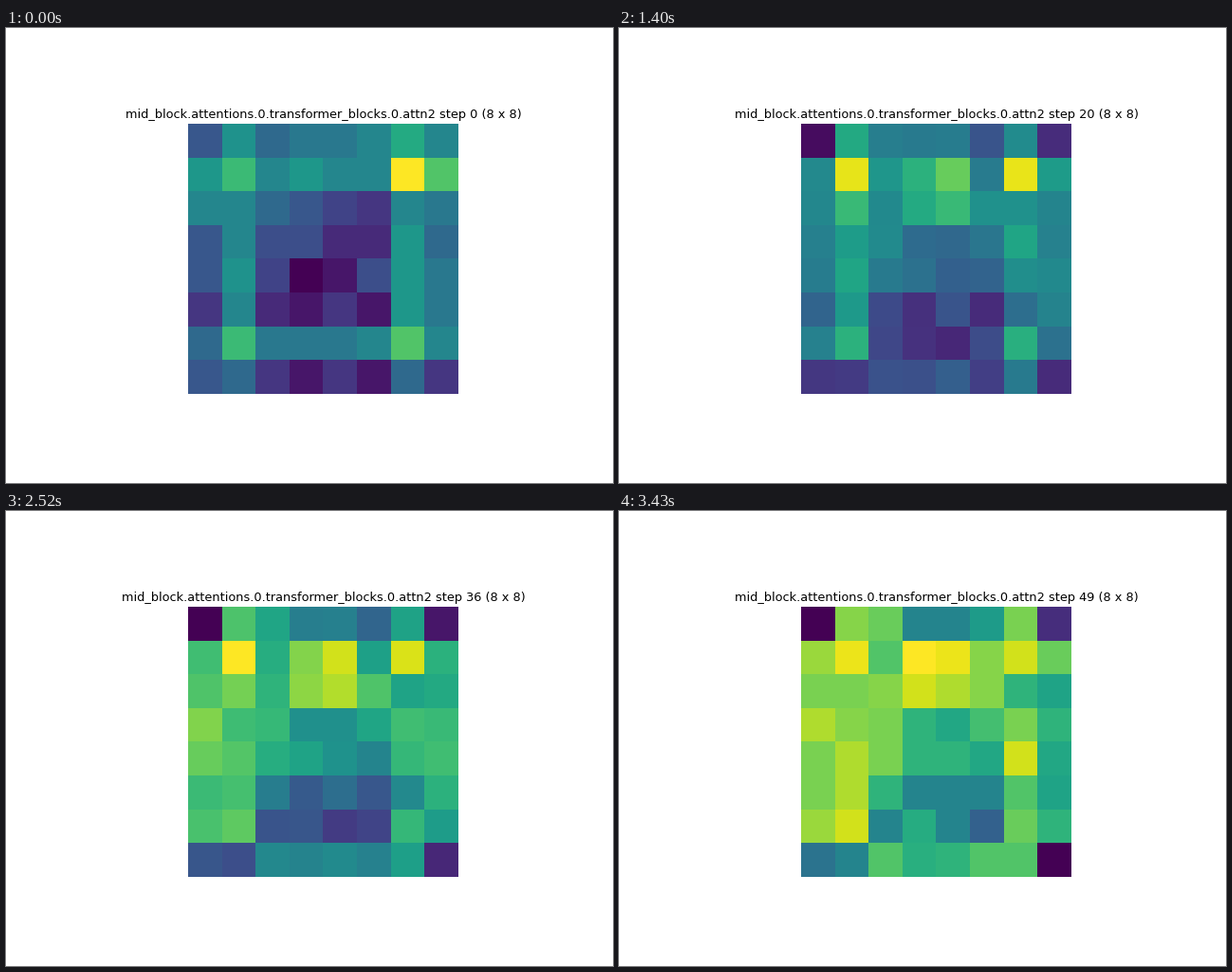
A matplotlib script that plays this animation: 640x480 px, repeating every 3.5 s.

```python
import numpy as np
import matplotlib.pyplot as plt
from matplotlib.animation import FuncAnimation

STEPS, INTERVAL = 50, 70
WIDTH, HEIGHT, DPI = 640, 480, 100
TITLE = "mid_block.attentions.0.transformer_blocks.0.attn2 step {} (8 x 8)"

# Attention in percent at the first and the last step.
first = np.array([
    [27, 51, 34, 40, 40, 46, 61, 46],
    [53, 68, 46, 53, 46, 46, 100, 73],
    [46, 46, 34, 27, 20, 16, 46, 40],
    [27, 46, 24, 24, 12, 12, 53, 34],
    [27, 51, 20, 0, 6, 24, 53, 40],
    [16, 46, 12, 6, 16, 6, 53, 40],
    [34, 68, 40, 40, 40, 46, 73, 46],
    [27, 34, 16, 6, 16, 6, 34, 16],
])
last = np.array([
    [0, 82, 77, 45, 45, 55, 80, 13],
    [85, 97, 73, 100, 97, 82, 93, 77],
    [80, 80, 82, 93, 88, 82, 65, 58],
    [88, 82, 80, 65, 60, 70, 80, 65],
    [80, 88, 80, 65, 65, 60, 93, 60],
    [80, 88, 65, 45, 45, 45, 73, 58],
    [85, 93, 45, 62, 45, 31, 77, 65],
    [38, 45, 73, 63, 65, 73, 73, 0],
])

rows, cols = np.mgrid[:8, :8]


def bump(row, col, height, row_spread=0.4, col_spread=0.4):
    return height * np.exp(-((rows - row) / row_spread) ** 2 / 2
                           - ((cols - col) / col_spread) ** 2 / 2)


# Passing attention: eyes and face rise, corners and mouth sink.
passing = sum([
    bump(1.3, 1, 26, 0.7), bump(1.7, 4, 36, 0.7), bump(2.4, 5, 26, 0.6),
    bump(2, 3, 20), bump(4, 3, 24), bump(3.3, 2, 14, 0.7), bump(4, 4, 12, 0.8),
    bump(0, 0, -20, 0.6), bump(1.5, 0, -18, 0.5), bump(0.4, 7, -34, 0.6),
    bump(0, 6, -15), bump(0.4, 5, -30, 0.5), bump(4.7, 6, -24, 0.6),
    bump(6, 3.5, -33, 0.4, 1.5), bump(7, 0.6, -24, 0.4, 0.6),
    bump(7, 3.4, 12, 0.4, 0.5), bump(6, 7, -13, 0.5),
])
# The side columns brighten late.
sides = bump(3.5, 0, 26, 2.2) + bump(4, 7, 24, 2)


def attention(step):
    s = step / (STEPS - 1)
    drift = s ** 1.8
    swell = max(np.sin(np.pi * s), 0) ** 0.6
    late = swell * np.exp(-((step - 33) / 7) ** 2 / 2)
    grid = first + (last - first) * drift + passing * swell + sides * late
    return grid.clip(0, 100)


fig = plt.figure(figsize=(WIDTH / DPI, HEIGHT / DPI), dpi=DPI, facecolor="white")
ax = fig.add_axes([192 / WIDTH, 94 / HEIGHT, 285 / WIDTH, 285 / HEIGHT])
ax.axis("off")
image = ax.imshow(first, cmap="viridis", vmin=0, vmax=100, aspect="auto",
                  interpolation="nearest")
title = ax.set_title(TITLE.format(0), fontsize=9.25, pad=4.6,
                     fontfamily="DejaVu Sans", color="black")


def draw(step):
    image.set_data(attention(step))
    title.set_text(TITLE.format(step))
    return image, title


anim = FuncAnimation(fig, draw, frames=STEPS, interval=INTERVAL,
                     repeat=True, repeat_delay=0, blit=False)
plt.show()
```
